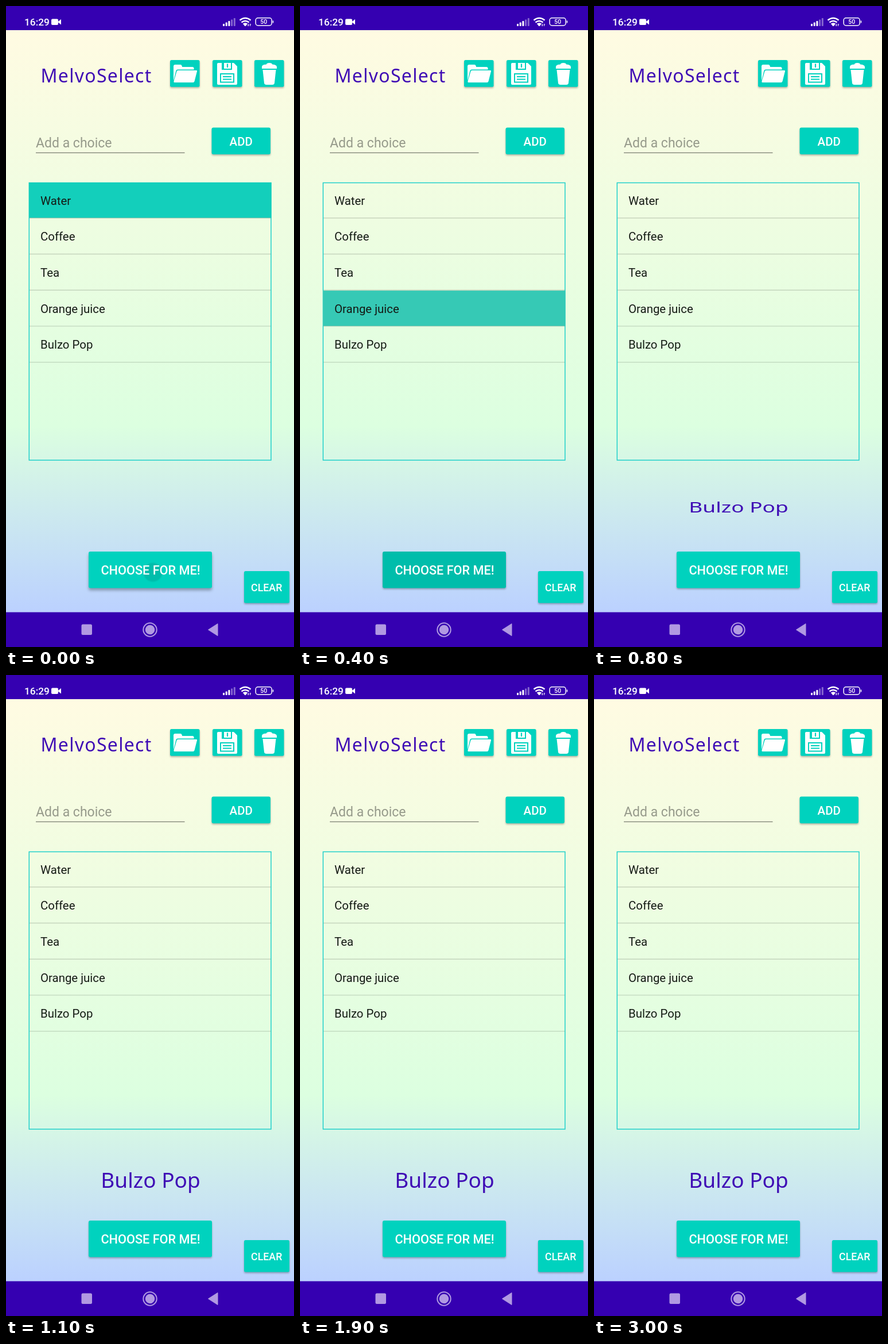
An HTML page that plays this animation: 502 px wide and 1115 px high, repeating every 3100 ms.

```html
<!DOCTYPE html>
<html lang="en">
<head>
<meta charset="utf-8">
<title>Random choice</title>
<style>
  html, body { margin: 0; width: 100%; height: 100%; overflow: hidden; background: #3500b1; }
  svg { display: block; width: 502px; height: 1115px; }
  text { font-family: Roboto, "Liberation Sans", sans-serif; }
  .item { font-size: 20.4px; fill: #151a15; }
  .label { font-weight: 500; fill: #fff; text-anchor: middle; }
  .brand { font-family: "Noto Sans", "Open Sans", sans-serif; fill: #3f0cb5; }
  .btn { fill: #00d2be; filter: drop-shadow(0 2px 1.5px rgba(0, 0, 0, .28)); }
  .teal { fill: #00d2be; }
  .white { fill: #fff; }
</style>
</head>
<body>
<svg viewBox="0 0 502 1115">
  <defs>
    <linearGradient id="sky" x1="0" y1="0" x2="0" y2="1">
      <stop offset="0" stop-color="#fffbe2"/>
      <stop offset=".68" stop-color="#dcffe0"/>
      <stop offset="1" stop-color="#bbd1ff"/>
    </linearGradient>
    <radialGradient id="ink">
      <stop offset=".82" stop-color="#000"/>
      <stop offset="1" stop-color="#000" stop-opacity="0"/>
    </radialGradient>
    <clipPath id="chooseClip"><rect x="144" y="949" width="215" height="63.5" rx="3"/></clipPath>
  </defs>

  <rect width="502" height="1115" fill="#3500b1"/>
  <rect y="42" width="502" height="1012.5" fill="url(#sky)"/>

  <!-- status bar -->
  <text x="32" y="34" font-size="17.3" font-weight="500" fill="#fff">16:29</text>
  <g class="white">
    <rect x="79" y="22.5" width="12" height="10.5" rx="2"/>
    <path d="M91 27l5-4v9.500l-5-4z"/>
    <g id="signal"></g>
    <circle cx="417" cy="33" r="2"/>
  </g>
  <g fill="none" stroke="#fff" stroke-width="2.500">
    <path d="M407.500 24.800q9.500-7.600 19 0M410.500 28.500q6.500-5 13 0M413.500 31.800q3.500-2.600 7 0"/>
    <rect x="435.200" y="20.800" width="28" height="13.200" rx="4" stroke-width="1.500"/>
    <path d="M465.500 25.500v4" stroke-width="1.600"/>
  </g>
  <path d="M422.500 31v4m-1.500-1.500l1.500 1.500M425.500 35v-4m1.500 1.500l-1.500-1.500" stroke="#fff" fill="none"/>
  <text class="label" x="449.200" y="31.300" font-size="10.500">50</text>

  <!-- header -->
  <text class="brand" x="60.500" y="132.500" font-size="32" letter-spacing="1.300">MelvoSelect</text>
  <rect class="btn" x="286" y="94" width="51.500" height="46.800" rx="2.500"/>
  <rect class="btn" x="360" y="94" width="51.500" height="46.800" rx="2.500"/>
  <rect class="btn" x="433" y="94" width="51.500" height="46.800" rx="2.500"/>
  <g class="white">
    <path d="M292 130V105q0-3 3-3h9q2 0 2.500 2l.7 2H325q2.500 0 2.500 2.500v2H299q-2 0-2.600 2z"/>
    <path d="M300 112H332q1.500 0 1 1.500l-4.500 17.500q-.5 2-2.500 2H293.500q-1.500 0-1-2l5-17q.5-2 2.500-2z"/>
    <path d="M368 101q0-2 2-2h27l6 6v30q0 2-2 2h-31q-2 0-2-2z"/>
    <path d="M446 106q0-3 4-4 3-.5 4-.5 0-2.500 5-2.500t5 2.500q8 .5 8 4.500v3h-26z"/>
    <path d="M447.500 111h23l-2.500 23q-.4 3-4 3h-10q-3.600 0-4-3z"/>
  </g>
  <g class="teal">
    <path d="M376 99h18v12h-18z"/>
    <path d="M373 117h25v16.500h-25z"/>
  </g>
  <g class="white">
    <path d="M380 99h12v10h-12z"/>
    <path d="M375 119h21v12.500h-21z"/>
  </g>
  <path d="M386 100.500v6.500M378 123h15M378 127.500h15" stroke="#00d2be" stroke-width="2.200"/>

  <!-- entry row -->
  <text x="52" y="245.500" font-size="23" fill="#969a8b">Add a choice</text>
  <path d="M52 255.300H311.500" stroke="#7b7d72" stroke-width="1.300"/>
  <rect class="btn" x="358.500" y="211.500" width="102.500" height="46.500" rx="3"/>
  <text class="label" x="409.700" y="243" font-size="20.400">ADD</text>

  <!-- list -->
  <rect x="40.300" y="307.500" width="421.700" height="482.500" fill="none" stroke="#20d0ca" stroke-width="1.500"/>
  <rect id="pick" x="40" width="422.500" height="61.500"/>
  <g id="list"></g>

  <!-- result and lower buttons -->
  <g id="result"><text class="brand" x="252" y="892" font-size="37" text-anchor="middle">Bulzo Pop</text></g>
  <rect class="btn" id="choose" x="144" y="949" width="215" height="63.500" rx="3"/>
  <g clip-path="url(#chooseClip)"><circle id="ripple" cx="256" cy="985" fill="url(#ink)"/></g>
  <text class="label" x="252" y="989" font-size="21.700">CHOOSE FOR ME!</text>
  <rect class="btn" x="415" y="983" width="79" height="55.500" rx="2.500"/>
  <text class="label" x="454.200" y="1018" font-size="17.800">CLEAR</text>

  <!-- navigation bar -->
  <g fill="#b199e2">
    <rect x="131.500" y="1075.500" width="18.500" height="18.500" rx="2.500"/>
    <circle cx="251" cy="1085" r="8.300"/>
    <circle cx="251" cy="1085" r="11.700" fill="none" stroke="#b199e2" stroke-width="2"/>
    <path d="M352.500 1085L369 1074.500V1095.500z" stroke="#b199e2" stroke-linejoin="round"/>
  </g>
</svg>
<script>
  const LOOP = 3100, STEP = 100;
  const ROW_TOP = 307, ROW_PITCH = 62.7, ROW_TIME = 125, ROW_LEAD = 60;
  const items = ["Water", "Coffee", "Tea", "Orange juice", "Bulzo Pop"];
  const byId = id => document.getElementById(id);

  function add(parent, tag, attrs, text = "") {
    const node = document.createElementNS("http://www.w3.org/2000/svg", tag);
    for (const key in attrs) node.setAttribute(key, attrs[key]);
    node.textContent = text;
    byId(parent).append(node);
  }

  items.forEach((name, i) => {
    const y = ROW_TOP + i * ROW_PITCH;
    add("list", "text", { class: "item", x: 60, y: y + 38.5 }, name);
    add("list", "path", { d: `M41 ${y + 61.8}H461.500`, stroke: "#000", "stroke-opacity": .16, "stroke-width": 1.4 });
  });
  for (let i = 0; i < 5; i++) {
    const h = 4 + i * 2.5;
    add("signal", "rect", { x: 378 + i * 4.7, y: 35 - h, width: 3, height: h, rx: 1, opacity: i < 3 ? 1 : .4 });
  }

  const pick = byId("pick"), result = byId("result"), ripple = byId("ripple"), choose = byId("choose");
  const clamp = v => Math.min(1, Math.max(0, v));
  const mix = (a, b, f) => a.map((v, i) => Math.round(v + (b[i] - v) * f));

  function draw(t) {
    // each row flashes teal, then warms as it fades
    const phase = (t + ROW_LEAD) / ROW_TIME;
    const row = Math.floor(phase);
    pick.style.display = row < items.length ? "" : "none";
    pick.setAttribute("y", ROW_TOP + row * ROW_PITCH);
    pick.setAttribute("fill", `rgb(${mix([0, 210, 190], [231, 171, 151], .75 * (phase - row) ** 3)})`);

    // press ripple
    ripple.setAttribute("r", 18 + t * .58);
    ripple.setAttribute("opacity", .1 * clamp((700 - t) / 200));
    choose.style.filter = t < 100 ? "drop-shadow(0 4px 2.5px rgba(0,0,0,.3))" : "";

    // answer unfolds downward
    const grow = clamp((t - 600) / 290);
    result.style.display = grow > 0 ? "" : "none";
    result.setAttribute("transform", `translate(0 858) scale(1 ${grow}) translate(0 -858)`);
  }

  const start = performance.now();
  function tick() {
    const t = (performance.now() - start) % LOOP;
    draw(Math.floor(t / STEP) * STEP);
    requestAnimationFrame(tick);
  }
  tick();
</script>
</body>
</html>
```
